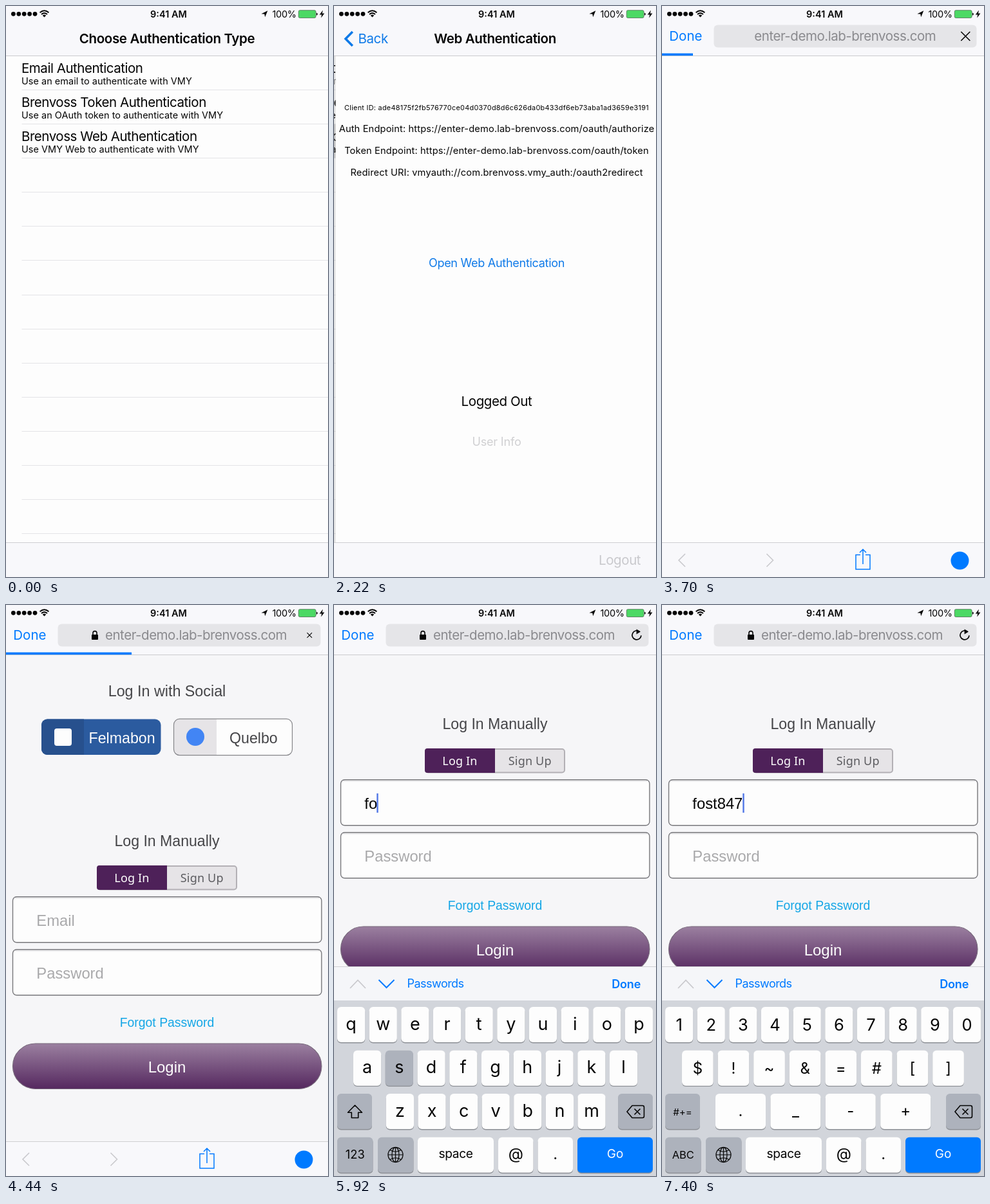
Animation of 500 by 888 pixels, one loop 8 s. Source, as an HTML page:

```html
<!DOCTYPE html>
<html lang="en">
<head>
<meta charset="utf-8">
<title>Sign-in walkthrough</title>
<style>
  html, body { margin: 0; width: 100%; height: 100%; overflow: hidden; background: #fdfdfd; }
  svg { display: block; width: 100%; height: 100%; }
  text { white-space: pre; }
</style>
</head>
<body>
<svg id="stage" viewBox="0 0 500 888"></svg>
<script>
const STEP = 740, LOOP = 8000;
const BLUE = '#007aff', PAPER = '#fdfdfd', BAR = '#f8f8fb', INK = '#050505', FADED = '#c9c9cd';
const UI = 'Inter, sans-serif', WEB = 'Liberation Sans, Arial, sans-serif', SEGMENT = 'Noto Sans, sans-serif';
const TIGHT = -0.02;
const HOST = 'enter-demo.lab-brenvoss.com';

// Drawing helpers
const text = (x, y, str, size, { fill = INK, anchor = 'start', weight = 400, font = UI, track = 0 } = {}) =>
  `<text x="${x}" y="${y}" font-size="${size}" fill="${fill}" text-anchor="${anchor}" font-weight="${weight}" font-family="${font}" letter-spacing="${track * size}">${str}</text>`;
const centred = (x, y, str, size, options) => text(x, y, str, size, { anchor: 'middle', ...options });
const rect = (x, y, w, h, fill, extra = '') =>
  `<rect x="${x}" y="${y}" width="${w}" height="${h}" fill="${fill}" ${extra}/>`;
const circle = (x, y, r, fill, extra = '') => `<circle cx="${x}" cy="${y}" r="${r}" fill="${fill}" ${extra}/>`;
const line = (d, stroke, width = 1.5, extra = '') =>
  `<path d="${d}" fill="none" stroke="${stroke}" stroke-width="${width}" ${extra}/>`;
const shape = (d, fill) => `<path d="${d}" fill="${fill}"/>`;
const shift = (x, y, body) => `<g transform="translate(${x} ${y})">${body}</g>`;

function statusBar() {
  const dots = [0, 1, 2, 3, 4].map(i => circle(11.4 + i * 8.4, 12.3, 3.4, INK)).join('');
  const wifi = line('M52.6 10.2Q59.5 4.2 66.4 10.2M55 12.9Q59.5 9 64 12.9', INK, 2)
    + shape('M56.8 14.7Q59.5 12.4 62.2 14.7L59.5 17.6Z', INK);
  const battery = rect(454.3, 6.7, 26.8, 11.8, '#4cd964', 'rx="2" stroke="#4d6b53" stroke-width=".8"')
    + shape('M482 10.4Q483.8 10.8 483.8 12.6Q483.8 14.4 482 14.8Z', INK);
  return dots + wifi + battery
    + centred(252.5, 17.6, '9:41 AM', 14.5, { weight: 600 })
    + shape('M406.3 7.3L402.2 17.2L401.3 12.6L396.4 12.2Z', INK)
    + text(413.5, 17.6, '100%', 14.5, { track: -0.02 })
    + shape('M492 6.5L486.8 13.4H490.2L489.2 18.6L494.4 11.4H491Z', INK);
}

const topBar = body => rect(0, 0, 500, 77, BAR) + rect(0, 77, 500, 1, '#cbcbce') + statusBar() + body;
const bottomBar = body => rect(0, 834, 500, 54, BAR) + rect(0, 834, 500, 1, '#cfcfd2') + body;
const navTitle = str => centred(250, 58, str, 20.53, { weight: 600, track: -0.0175 });

// Authentication list
function listRows(selected) {
  const rows = [
    ['Email Authentication', 'Use an email to authenticate with VMY'],
    ['Brenvoss Token Authentication', 'Use an OAuth token to authenticate with VMY'],
    ['Brenvoss Web Authentication', 'Use VMY Web to authenticate with VMY'],
  ];
  let out = rect(0, 77, 500, 758, PAPER);
  if (selected) out += rect(0, 183.5, 500, 53, '#d9d9d9');
  for (let i = 1; i <= 14; i++) out += rect(24.5, Math.floor(77.3 + i * 53.1), 475.5, 1, '#e4e4e7');
  rows.forEach(([title, detail], i) => {
    const y = i * 53.1;
    out += text(24, 103.5 + y, title, 20.53, { track: -0.023 });
    out += text(24, 121.7 + y, detail, 14.5, { track: 0.001 });
  });
  return out;
}
const listScreen = () => listRows(false) + topBar(navTitle('Choose Authentication Type')) + bottomBar('');

// Web authentication details; x is what remains of the push transition
function detailScreen(x) {
  const endpoint = (y, str) => centred(250, y, str, 14.7, { track: 0.008 });
  const page = rect(0, 77, 500, 758, PAPER)
    + centred(250, 162.3, 'Client ID: ade48175f2fb576770ce04d0370d8d6c626da0b433df6eb73aba1ad3659e3191', 10.9, { track: 0.024 })
    + endpoint(196.3, `Auth Endpoint: https://${HOST}/oauth/authorize`)
    + endpoint(230.3, `Token Endpoint: https://${HOST}/oauth/token`)
    + endpoint(264.3, 'Redirect URI: vmyauth://com.brenvoss.vmy_auth:/oauth2redirect')
    + centred(250, 406, 'Open Web Authentication', 18.1, { fill: '#0f7ae8', track: -0.018 })
    + centred(250, 621.6, 'Logged Out', 20.53, { track: TIGHT })
    + centred(250, 684, 'User Info', 18.1, { fill: '#d0d0d2', track: -0.012 });
  const behind = x ? shift(-149, 0, listRows(true)) + rect(0, 77, 500, 758, '#000', 'opacity=".1"') : '';
  return behind + shift(x, 0, page)
    + topBar(line('M28.8 40L18 51L28.8 62', '#0f7ae8', 3.6)
      + text(37.5, 58, 'Back', 20.53, { fill: '#0f7ae8', track: TIGHT }) + navTitle('Web Authentication'))
    + bottomBar(text(411, 869, 'Logout', 20.53, { fill: FADED, track: TIGHT }));
}

// In-app browser
const cross = r => line(`M${471.3 - r} ${47 - r}l${2 * r} ${2 * r}m0 ${-2 * r}l${-2 * r} ${2 * r}`, INK, r > 5 ? 1.6 : 1.1);
const reload = line('M474.6 41.6A7 7 0 1 0 477 47.4', INK, 1.7) + shape('M469.6 37.6L476 41.6L469.6 45.4Z', INK);
const lock = rect(133, 46, 10, 8, INK, 'rx="1"') + line('M135 46.5V43.6a3 3 0 0 1 6 0V46.5', INK, 1.6);

function browserTop({ secure, control, progress = 0 }) {
  return topBar(text(11.3, 54, 'Done', 20.53, { fill: BLUE })
    + rect(80.5, 29.5, 408, 35, '#e5e5e8', 'rx="6"')
    + (secure ? lock : '')
    + centred(secure ? 295 : 284.3, 53.8, HOST, 20.53, { fill: '#8a8a8e', track: -0.023 })
    + control + rect(0, 73.6, progress, 3.6, BLUE));
}
const browserBottom = () => bottomBar(
  line('M36 852L26 862L36 872', FADED, 1.6) + line('M162.5 852L172.5 862L162.5 872', FADED, 1.6)
  + line('M308 853.5H301V876H323V853.5H316M312 868V845M307 850L312 845L317 850', BLUE, 1.5)
  + circle(462.5, 862.5, 14, BLUE));

function field(y, content) {
  return rect(10.5, y, 479.5, 71, PAPER, 'rx="6" stroke="#77777b" stroke-width="1.4"')
    + rect(13, y + 1.2, 474.5, 1.4, '#e2e2e4') + content;
}

function loginPage(scroll, typed = '', caretX = 0) {
  const web = (x, y, str, size, fill) => text(x, y, str, size, { fill, font: WEB });
  const webMid = (y, str, size, fill) => centred(250, y, str, size, { fill, font: WEB });
  const caret = caretX ? rect(caretX, 475, 2.4, 30, '#5076e6') : '';
  return rect(0, 77, 500, 758, '#f6f6f8') + shift(0, -scroll,
    webMid(141.8, 'Log In with Social', 23.3, '#454548')
    + rect(55, 177.5, 185.5, 55.5, '#2b5b9f', 'rx="9"')
    + shape('M64 177.5H121V233H64A9 9 0 0 1 55 224V186.5A9 9 0 0 1 64 177.5Z', '#27508d')
    + rect(75, 192, 27, 27, PAPER, 'rx="4"')
    + web(128.5, 215, 'Felmabon', 23.2, PAPER)
    + rect(260.5, 177.2, 184, 56.4, PAPER, 'rx="9"')
    + shape('M269 177.2H327V233.6H269A9 9 0 0 1 260.5 225V186A9 9 0 0 1 269 177.2Z', '#e6e4e7')
    + rect(260.5, 177.2, 184, 56.4, 'none', 'rx="9" stroke="#858589" stroke-width="1.2"')
    + circle(294, 205, 14, '#4285f4')
    + web(347, 215, 'Quelbo', 23.2, '#454548')
    + webMid(374.5, 'Log In Manually', 23.1, '#454548')
    + rect(142, 406, 216, 36.5, '#e6e4e7', 'rx="4" stroke="#b3b0b5" stroke-width="2"')
    + shape('M145 405H250V443H145A4 4 0 0 1 141 439V409A4 4 0 0 1 145 405Z', '#4e2159')
    + centred(195.5, 431, 'Log In', 18, { fill: PAPER, font: SEGMENT, track: 0.01 })
    + centred(304.2, 431, 'Sign Up', 18, { fill: '#5c5c60', font: SEGMENT, track: 0.01 })
    + field(453.8, web(47.3, 499, typed || 'Email', 23.8, typed ? INK : '#a9a9ab') + caret)
    + field(535.8, web(47.3, 581, 'Password', 23.8, '#a9a9ab'))
    + webMid(656, 'Forgot Password', 19.4, '#14a6e6')
    + rect(10.5, 682, 479.5, 70.5, 'url(#plum)', 'rx="35.2" stroke="#77687b" stroke-width="1.2"')
    + webMid(726.5, 'Login', 24, PAPER));
}

// Keyboard, laid out with its accessory bar at y = 562
const GREY = '#adb2bc';
const key = (x, y, w, label, { size = 27, fill = PAPER, ink = INK, dy = 35.5, track = 0 } = {}) =>
  rect(x, y + 1.4, w, 55, '#8d9096', 'rx="6"') + rect(x, y, w, 55, fill, 'rx="6"')
  + centred(x + w / 2, y + dy, label, size, { fill: ink, track });
const keyRow = (labels, x, y, w, pitch, options, pressed) => labels.split(' ').map((label, i) =>
  key(x + i * pitch, y, w, label, label === pressed ? { ...options, fill: GREY } : options)).join('');

function keyboard(numeric, pressed) {
  const symbol = { size: 25.5, dy: 36.5 };
  const rows = numeric
    ? keyRow('1 2 3 4 5 6 7 8 9 0', 5, 625, 43.2, 49.65, symbol)
      + keyRow('$ ! ~ &amp; = # [ ]', 31, 692.7, 48.7, 55.6, { size: 24, dy: 36 })
      + keyRow('. _ - +', 83, 760, 78, 85.4, { size: 24, dy: 35 })
      + key(5, 760, 54, '#+=', { size: 15, fill: GREY, dy: 34 })
    : keyRow('q w e r t y u i o p', 5, 625, 43.2, 49.65, {}, pressed)
      + keyRow('a s d f g h j k l', 30, 692.7, 43.2, 49.75, {}, pressed)
      + keyRow('z x c v b n m', 80.8, 760, 43.2, 49.6, {}, pressed)
      + key(5, 760, 54, '', { fill: GREY })
      + line('M32.5 778L21.5 789.2H27.3V797.5H37.7V789.2H43.5Z', INK, 1.6, 'stroke-linejoin="round"');
  return rows
    + key(441, 760, 54, '', { fill: GREY })
    + line('M455 788L463 778.5H479Q481.5 778.5 481.5 781V795Q481.5 797.5 479 797.5H463ZM466.5 783.5l9 9m0 -9l-9 9', INK, 1.6)
    + key(5, 827.8, 55.5, numeric ? 'ABC' : '123', { size: numeric ? 16.5 : 18.3, fill: GREY, dy: 33.5 })
    + key(68, 827.8, 55.5, '', { fill: GREY })
    + line('M84 855H107M95.5 843.5V866.5M87 847.5Q95.5 853 104 847.5M87 862.5Q95.5 857 104 862.5', INK, 1.2)
    + circle(95.5, 855, 11.5, 'none', `stroke="${INK}" stroke-width="1.3"`)
    + `<ellipse cx="95.5" cy="855" rx="5.5" ry="11.5" fill="none" stroke="${INK}" stroke-width="1.2"/>`
    + key(130, 827.8, 118, 'space', { size: 19.2, dy: 32.2, track: TIGHT })
    + key(255, 827.8, 54.5, '@', { size: 24, dy: 34.5 })
    + key(316.5, 827.8, 54.5, '.', { size: 24, dy: 34 })
    + key(378, 827.8, 117, 'Go', { size: 19, fill: BLUE, ink: PAPER, dy: 32.2 });
}

function inputPanel({ top = 562, suggestion = false, numeric = false, pressed }) {
  const accessory = rect(0, 562, 500, 53, '#f5f6f9') + rect(0, 562, 500, 1, '#cfcfd3')
    + line('M25 596L37 583.5L49 596', FADED, 1.8) + line('M69.5 583L81.5 595L93.5 583', BLUE, 2)
    + text(113.5, 595.3, 'Passwords', 18.1, { fill: BLUE, track: -0.032 })
    + text(431.3, 596.3, 'Done', 18.1, { fill: BLUE, weight: 600, track: -0.015 });
  const hint = suggestion
    ? rect(0, 615, 500, 54, '#b8bdc7') + rect(41, 615, 1.2, 54, '#d5d8de') + rect(458, 615, 1.2, 54, '#d5d8de')
      + centred(249.5, 633.5, 'home', 14.5, { fill: '#e6e8ec' })
      + centred(250, 655.3, 'setup@brenvoss.com', 18.3, { fill: PAPER })
    : '';
  return shift(0, top - 562, rect(0, 562, 500, 400, '#d2d5db') + accessory + hint
    + shift(0, suggestion ? 53.3 : 0, keyboard(numeric, pressed)));
}

const loading = () => rect(0, 77, 500, 758, PAPER)
  + browserTop({ secure: false, control: cross(7), progress: 48 }) + browserBottom();
const loaded = () => loginPage(0)
  + browserTop({ secure: true, control: cross(3.8), progress: 195 }) + browserBottom();
const editing = (scroll, typed, caretX, panel) => loginPage(scroll, typed, caretX)
  + browserTop({ secure: true, control: reload }) + inputPanel(panel);

const scenes = [
  listScreen, listScreen, listScreen,
  () => detailScreen(2.5), () => detailScreen(0),
  loading, loaded,
  () => editing(83.6, '', 47, { top: 626.7, suggestion: true }),
  () => editing(182, 'fo', 66.3, { pressed: 's' }),
  () => editing(182, 'fost', 85, { numeric: true }),
  () => editing(182, 'fost847', 125.3, { numeric: true }),
];

const defs = `<defs><linearGradient id="plum" x2="0" y2="1">
  <stop stop-color="#9b80a0"/><stop offset="1" stop-color="#55285f"/></linearGradient></defs>`;
const stage = document.getElementById('stage');
const start = performance.now();
let shown = -1;

function tick() {
  const index = Math.floor(((performance.now() - start) % LOOP) / STEP);
  if (index !== shown) {
    shown = index;
    stage.innerHTML = defs + rect(0, 0, 500, 888, PAPER) + scenes[index]();
  }
  requestAnimationFrame(tick);
}
tick();
</script>
</body>
</html>
```
